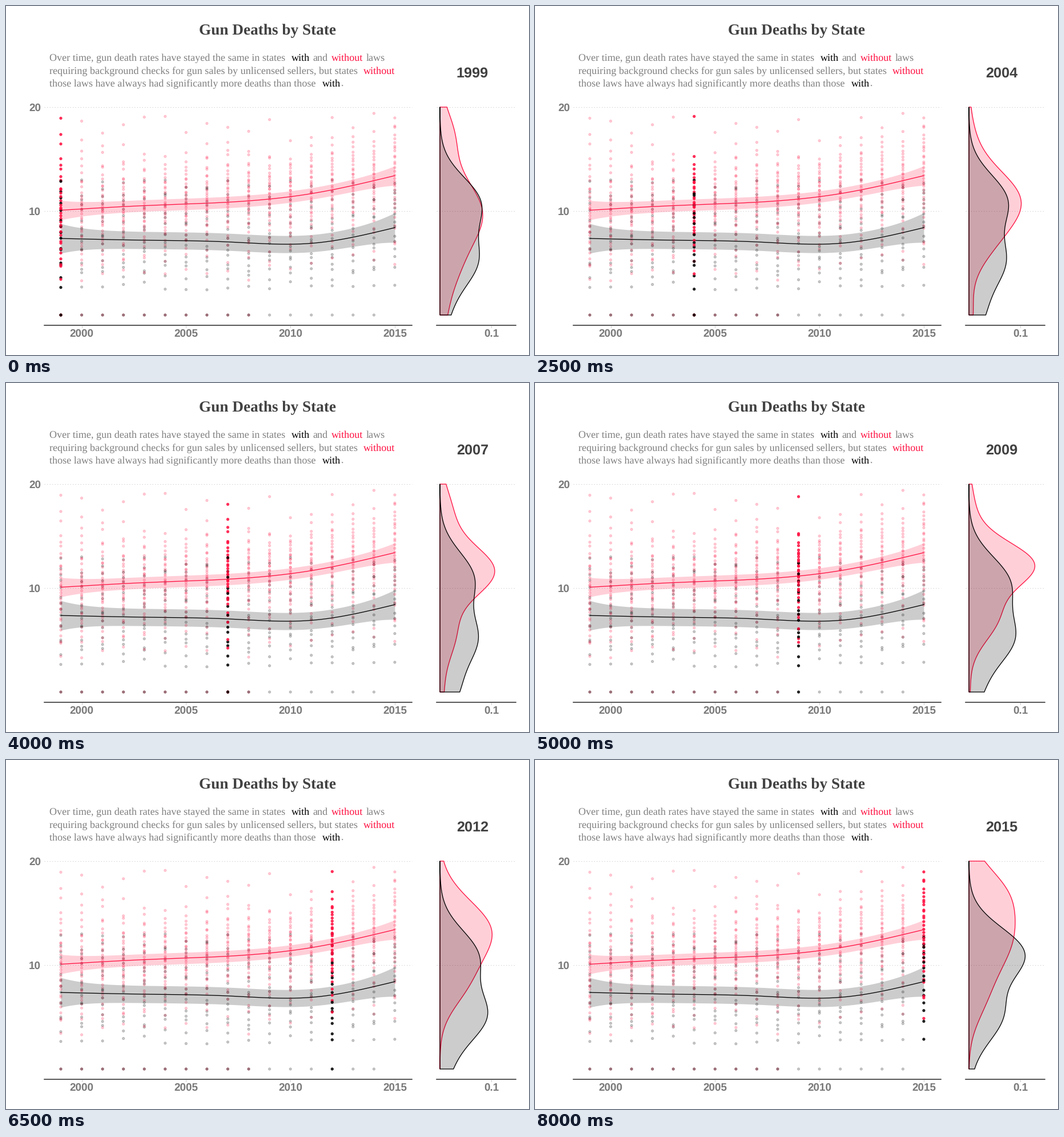
Recreate the animation shown at these times as a matplotlib script. Size 916x611 px, loop 8500 ms.

```python
import numpy as np
import matplotlib.pyplot as plt
from matplotlib.animation import FuncAnimation
from matplotlib.colors import to_rgba
from matplotlib.patches import Polygon

W, H, DPI = 916, 611, 100
PT = 72 / DPI
RED, BLACK = "#ff0f40", "#000000"
DARK, GREY, SOFT = "#414141", "#7a7a7a", "#808080"
FIRST, LAST = 1999, 2015
YEARS = range(FIRST, LAST + 1)
RATES = np.linspace(20, 0, 201)
rng = np.random.default_rng(12)
plt.rcParams["text.hinting"] = "none"


def px(year):
    return 96 + (year - FIRST) * 36.56


def py(rate):
    return 541 - 18.2 * rate


def spline(x, y, xs):
    """Natural cubic spline through evenly spaced points."""
    x, y = np.asarray(x, float), np.asarray(y, float)
    n, h = len(x), x[1] - x[0]
    a, b = np.eye(n), np.zeros(n)
    for i in range(1, n - 1):
        a[i, i - 1:i + 2] = 1, 4, 1
        b[i] = 6 * (y[i - 1] - 2 * y[i] + y[i + 1]) / h ** 2
    m = np.linalg.solve(a, b)
    i = np.clip(((xs - x[0]) / h).astype(int), 0, n - 2)
    u, v = x[i + 1] - xs, xs - x[i]
    return ((m[i] * u ** 3 + m[i + 1] * v ** 3) / (6 * h)
            + (y[i] / h - m[i] * h / 6) * u
            + (y[i + 1] / h - m[i + 1] * h / 6) * v)


# A density is a sum of bumps (centre, spread, height in pixels);
# values given as a list drift between the key years.
KEYS = [1999, 2004, 2007, 2010, 2012, 2014, 2015]
RED_BUMPS = [
    (17.3, 2.4, [22, 6, 20, 5, 2, 16, 40]),
    ([9.7, 11, 11.6, 12.6, 13.2, 13, 12.5],
     [3.3, 2.9, 2.4, 2, 2.9, 2.6, 3.4],
     [74, 88, 94, 118, 88, 98, 72]),
    ([4, 6.5, 5.5, 8, 8, 7, 6.5], 2.3, [17, 21, 26, 60, 34, 24, 17]),
    (0, 2.2, [9, 7, 6, 0, 0, 0, 0])]
BLACK_BUMPS = [
    ([10.8, 11, 11, 10.4, 10.9, 11, 11.1], 2.5,
     [68, 65, 57, 72, 64, 80, 95]),
    (5.1, 2.5, [62, 60, 62, 80, 78, 64, 56]),
    (0, 2.2, [12, 22, 27, 13, 14, 7, 3])]


def at_year(value, year):
    return np.interp(year, KEYS, value) if isinstance(value, list) else value


def density(bumps, year):
    total = np.zeros_like(RATES)
    for bump in bumps:
        c, s, h = (at_year(v, year) for v in bump)
        total += h * np.exp(-((RATES - c) / s) ** 2 / 2)
    return total


def sample(d, lo, hi, n):
    """Spread n rates between lo and hi, a little tighter than density d."""
    r, w = RATES[::-1], d[::-1] ** 1.4
    cdf = np.cumsum(np.where((r >= lo) & (r <= hi), w, 0))
    q = (np.arange(n) + rng.random(n)) / n
    return np.interp(q * cdf[-1], cdf, r)


def year_dots(year, red, black):
    dots = [(r, RED) for r in sample(red, 3.2, 19.4, 33)]
    dots += [(r, BLACK) for r in sample(black, 2.4, 13.2, 15)]
    dots = [dots[k] for k in rng.permutation(len(dots))]
    if year < 2009:
        dots += [(0, BLACK), (0, RED)]
    if year < LAST:
        dots += [(0, BLACK)]
    pos = np.array([(px(year), py(r)) for r, _ in dots])
    return pos, [c for _, c in dots]


red_density = [density(RED_BUMPS, y) for y in YEARS]
black_density = [density(BLACK_BUMPS, y) for y in YEARS]
DOTS = [year_dots(*args) for args in zip(YEARS, red_density, black_density)]

fig = plt.figure(figsize=(W / DPI, H / DPI), dpi=DPI, facecolor="white")
ax = fig.add_axes([0, 0, 1, 1])
ax.set(xlim=(0, W), ylim=(H, 0))
ax.axis("off")


def text(x, y, s, size, color, font="Liberation Sans", weight="bold",
         ha="center"):
    return ax.text(x, y, s, fontsize=size * PT, color=color, family=font,
                   weight=weight, ha=ha, va="baseline", zorder=8)


def line(xs, ys, color, width, **kw):
    ax.plot(xs, ys, color=color, lw=width * PT, **kw)


# Heading and text
text(458, 50, "Gun Deaths by State", 27.2, DARK, "Liberation Serif")
RUNS = [
    (76, 96, "Over time, gun death rates have stayed the same in states", SOFT),
    (500, 96, "with", BLACK), (537, 96, "and", SOFT),
    (570, 96, "without", RED), (631, 96, "laws", SOFT),
    (76, 119, "requiring background checks for gun sales by unlicensed "
              "sellers, but states", SOFT),
    (626, 119, "without", RED),
    (76, 141, "those laws have always had significantly more deaths than "
              "those", SOFT),
    (554, 141, "with", BLACK), (587, 141, ".", SOFT)]
for x, y, s, color in RUNS:
    text(x, y, s, 18.2, color, "Liberation Serif", "normal", "left")

# Axes and grid
for x0, x1 in ((67, 711), (754, 893)):
    for rate in (10, 20):
        line([x0, x1], [py(rate)] * 2, "#d2d2d2", 1, zorder=0,
             dashes=(1.5, 3), dash_capstyle="butt")
    line([x0, x1], [559, 559], "#222222", 1.5, zorder=1)
for x, s in [(px(y), str(y)) for y in range(2000, 2016, 5)] + [(850, "0.1")]:
    line([x, x], [560, 563], "#cccccc", 1, zorder=0)
    text(x, 579, s, 18.9, GREY)
for rate in (10, 20):
    text(61, py(rate) + 6.5, str(rate), 18.9, GREY, ha="right")

# Faint dots for all years
DOT = dict(s=(4.2 * PT) ** 2, linewidths=0.9 * PT)
ax.scatter(*np.vstack([p for p, _ in DOTS]).T, zorder=2, **DOT,
           c=[to_rgba(c, 0.21) for _, cs in DOTS for c in cs])

# Smoothed trends, with bands that flare at both ends
xs = np.linspace(px(FIRST), px(LAST), 200)
flare = np.abs(np.linspace(-1, 1, 200)) ** 7
for color, mid, base, extra in (
        (BLACK, [407, 410, 413, 415.5, 388], 15, 11),
        (RED, [357.5, 349.5, 343.5, 328.5, 297], 10, 7)):
    ys = spline(np.linspace(xs[0], xs[-1], 5), mid, xs)
    half = base + extra * flare
    ax.fill_between(xs, ys - half, ys + half, color=color, alpha=0.2, lw=0,
                    zorder=3)
    line(xs, ys, color, 1.3, zorder=4)

# Moving parts
active = ax.scatter([], [], zorder=5, **DOT)
label = text(817, 125, "", 25.2, DARK)


def add_shape(color, z):
    return ax.add_patch(Polygon([(0, 0)], fc=to_rgba(color, 0.2), ec=color,
                                lw=1.3 * PT, zorder=z, joinstyle="miter"))


shapes = [(add_shape(RED, 6), red_density),
          (add_shape(BLACK, 7), black_density)]


def update(i):
    pos, colors = DOTS[i]
    active.set_offsets(pos)
    active.set_color([to_rgba(c, 0.8) for c in colors])
    label.set_text(str(FIRST + i))
    for patch, curves in shapes:
        edge = np.column_stack([760 + curves[i], py(RATES)])
        patch.set_xy(np.vstack([[760, py(20)], edge, [760, py(0)]]))
    return [active, label] + [p for p, _ in shapes]


anim = FuncAnimation(fig, update, frames=len(YEARS), interval=500,
                     repeat=True, repeat_delay=0)
plt.show()
```
